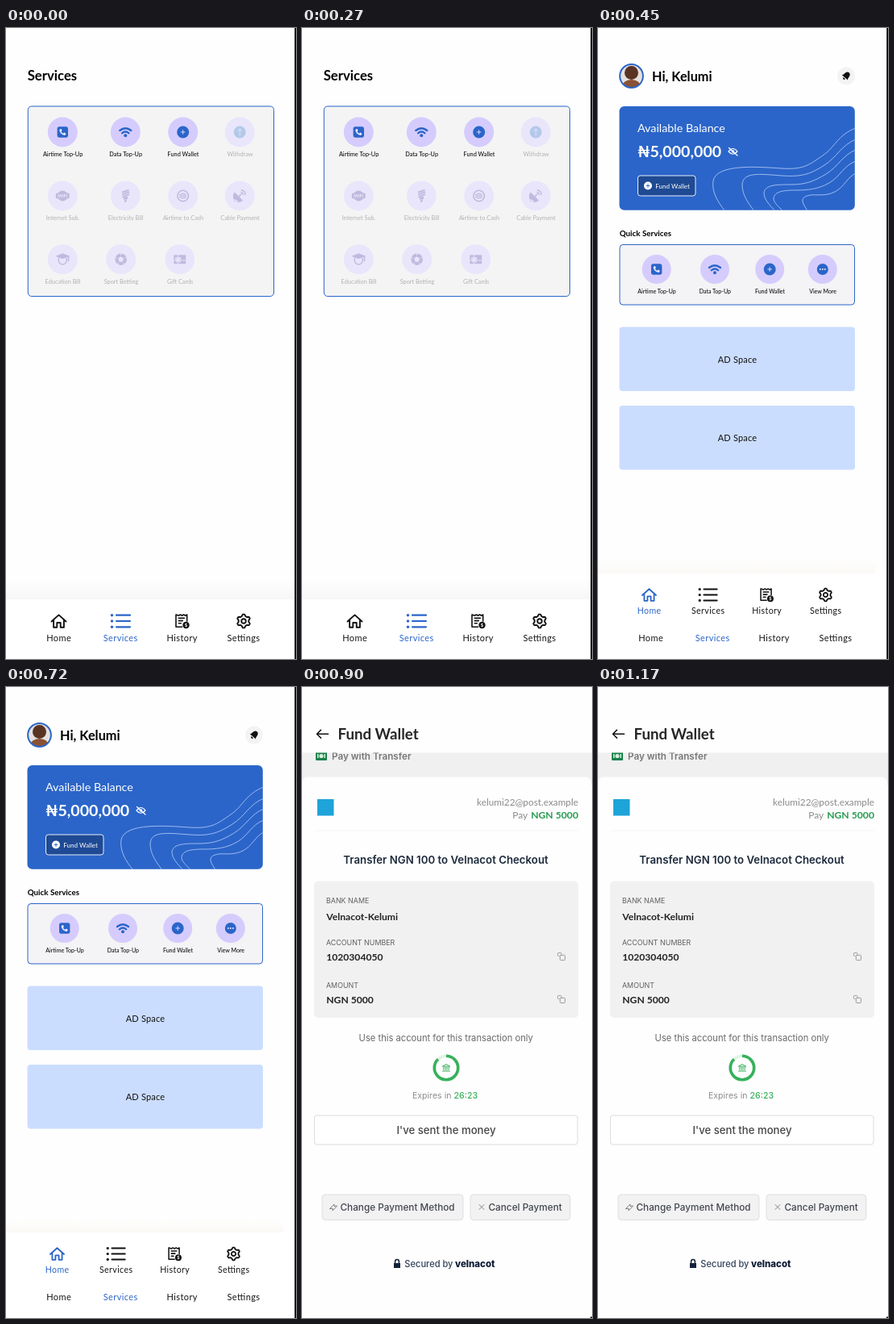
An HTML page that plays this animation: 360 by 782 pixels, repeating every 1.35 s.

```html
<!DOCTYPE html>
<html lang="en">
<head>
<meta charset="utf-8">
<title>Wallet app screens</title>
<style>
  html, body { margin: 0; width: 100%; height: 100%; overflow: hidden; background: #fefefe; }
  svg { display: block; width: 100vw; height: 100vh; }
  text { font-family: Lato, sans-serif; font-feature-settings: "liga"; white-space: pre; }
  .inter { font-family: Inter, sans-serif; }
  .line { fill: none; stroke: currentColor; stroke-linecap: round; stroke-linejoin: round; }
  .fill { fill: currentColor; }
  .screen { opacity: 0; animation: show 1350ms step-end infinite; }
  #home { animation-delay: -900ms; }
  #payment { animation-delay: -450ms; }
  @keyframes show {
    0% { opacity: 1; }
    33.3333%, 100% { opacity: 0; }
  }
</style>
</head>
<body>
<svg viewBox="0 0 360 782" xmlns="http://www.w3.org/2000/svg">
  <defs>
    <linearGradient id="shade" x2="0" y2="1">
      <stop stop-color="#fefefe"/><stop offset="1" stop-color="#f7f7f7"/>
    </linearGradient>
    <linearGradient id="warmShade" x2="0" y2="1">
      <stop stop-color="#fefefe"/><stop offset="1" stop-color="#fbf9f5"/>
    </linearGradient>
    <clipPath id="card"><rect x="26.5" y="97" width="292.3" height="128.7" rx="6"/></clipPath>
    <clipPath id="avatar"><circle cx="41.5" cy="59.5" r="14"/></clipPath>
    <clipPath id="scrolled"><rect y="81.5" width="360" height="31"/></clipPath>
  </defs>
  <g id="services" class="screen"></g>
  <g id="home" class="screen"></g>
  <g id="payment" class="screen"></g>
</svg>
<script>
const BLUE = '#2b65c9', LILAC = '#d5ccfd', PALE = '#f4f4f5', GREEN = '#36b15b';

const rect = (x, y, w, h, fill, r = 0, stroke = 'none') =>
  `<rect x="${x}" y="${y}" width="${w}" height="${h}" rx="${r}" fill="${fill}" stroke="${stroke}"/>`;
const circle = (x, y, r, fill, extra = '') =>
  `<circle cx="${x}" cy="${y}" r="${r}" fill="${fill}" ${extra}/>`;
const line = (d, width = 1) => `<path class="line" d="${d}" stroke-width="${width}"/>`;
const solid = d => `<path class="fill" d="${d}"/>`;
const at = (x, y, color, body, scale = 1) =>
  `<g transform="translate(${x} ${y}) scale(${scale})" color="${color}">${body}</g>`;

function text(x, y, size, str, { fill = '#000', weight = 400, anchor = 'start', space = 0, font = '' } = {}) {
  return `<text class="${font}" x="${x}" y="${y}" font-size="${size}" fill="${fill}" ` +
    `font-weight="${weight}" text-anchor="${anchor}" letter-spacing="${space}">${str}</text>`;
}
const inter = (x, y, size, str, options) => text(x, y, size, str, { font: 'inter', ...options });

const gearOutline = Array.from({ length: 24 }, (_, i) => {
  const r = i % 4 < 2 ? 8.4 : 6.3, a = (i - 0.5) * Math.PI / 12 - Math.PI / 2;
  return `${(r * Math.cos(a)).toFixed(2)} ${(r * Math.sin(a)).toFixed(2)}`;
}).join('L');

// Icons are centred on 0,0 and take their main colour from the group.
const paint = (d, color, width = 1) => `<g color="${color}">${line(d, width)}</g>`;
const disc = d => '<circle class="fill" r="7.5"/>' + paint(d, '#e4e6ff', 0.9);
const icons = {
  phone: '<rect class="fill" x="-6.7" y="-6.7" width="13.4" height="13.4" rx="2.6"/>' +
    '<path fill="#e9e6ff" d="M-3.6-3.6l1.9-.4 1 2.2-1.1 1q.8 1.7 2.6 2.5l1-1.1 2.2 1-.4 2q-1.2.7-3 0-3.1-1.3-4.3-4.4-.6-1.6.1-2.8z"/>',
  wifi: line('M-7-2Q0-7.6 7-2M-4.2 1.3Q0-2.2 4.2 1.3', 2.3) + '<circle class="fill" cy="4.2" r="2"/>',
  plus: disc('M-2.4 0h4.8M0-2.4v4.8'),
  up: disc('M0 4V-4M-2.4-1.7L0-4 2.4-1.7'),
  more: '<circle class="fill" r="7"/>' + [-3, 0, 3].map(x => circle(x, 0, 1, '#e4e6ff')).join(''),
  hotspot: '<circle class="fill" r="6.4"/><rect class="fill" x="-8.5" y="-3.5" width="17" height="7" rx="2"/>' +
    text(0, 2, 5.5, 'WiFi', { fill: '#ece9fb', weight: 700, anchor: 'middle' }),
  bulb: line('M-3.5-4.5L3.5-7M-3.5-1.8L4-4.4M-3 1L4-1.6', 1.9) + solid('M-3 2.2L3 .8 2.5 4-1.6 5zM-1.5 5.5l3-.7-.7 3.2h-1.8z'),
  swap: '<circle class="line" r="6.8" stroke-width="1.6"/>' +
    line('M-4-1.2Q0-4.4 4-1.2M-4 1.2Q0 4.4 4 1.2M-2.5 0h5', 1.4),
  dish: solid('M-6.3-4.5A7.2 7.2 0 0 0 4 5.8zM-6 4l4 3h-5z') + line('M-1 .6L1.7-2M1.8-4.3a3 3 0 0 1 2.5 2.6M2-7a5.8 5.8 0 0 1 5 5', 1.5),
  graduate: solid('M0-7.5L9-4 0-.5-9-4z') + line('M-5-1.5v2.6A5 5.3 0 0 0 5 1.1V-1.5M7.3-3.5V2', 1.5),
  ball: '<circle class="line" r="5.2" stroke-width="4.2"/>' +
    paint('M0-7v1.6M6.5-2.2l-1.5.5M4 5.6L3 4.3M-4 5.6l1-1.3M-6.5-2.2l1.5.5', '#e9e6fb', 1),
  gift: '<rect class="fill" x="-7.5" y="-5.5" width="15" height="11" rx="1.2"/>' +
    paint('M-7.5 1.3h15M-2-5.5v11M-2 .8l-2.4 2.5M-2 .8L.4 3.3M-2 .8q-4.4-1.2-3-2.7t3 2.7q4.4-1.2 3-2.7t-3 2.7', '#e9e6fb', 1.1),
  house: line('M-9 .5L0-7.6 9 .5M-6.4-1.2V7.7h4.2V2h4.4v5.7h4.2V-1.2', 1.9),
  list: [-7.3, 0, 7.3].map(y => `<circle class="fill" cx="-11" cy="${y}" r="1.7"/>` + line(`M-5.5 ${y}H11.5`, 2.2)).join(''),
  receipt: line('M6.2 0V-8l-2 1.2-2.1-1.2L0-6.8-2.1-8l-2.1 1.2L-7.5-8V7.2H0M-4.2-3.6h7M-4.2-.4h5M-4.2 2.8h3', 1.6) +
    '<circle class="fill" cx="5" cy="5" r="4.2"/>' +
    text(5, 7.1, 6, '$', { fill: '#fff', weight: 700, anchor: 'middle' }),
  gear: line(`M${gearOutline}Z`, 1.9) + '<circle class="line" r="2.8" stroke-width="1.9"/>',
  hiddenEye: line('M-5.5 0Q0-7 5.5 0Q0 6.5-5.5 0M-5-4.5L5.5 5', 1.2) + '<circle class="fill" r="1.8"/>',
  bell: `<g transform="rotate(40)">${solid('M-5 2.6q1.3-1 1.3-4Q-3.4-5.6 0-6q3.4.4 3.7 4.6 0 3 1.3 4zM-1.7 3.6h3.4q-.3 2-1.7 2t-1.7-2z')}</g>`,
  copy: '<rect class="line" x="-1.7" y="-1.7" width="6.2" height="6.2" rx="1"/>' + line('M-3-.7h-.7q-.8 0-.8-.8v-2.2q0-.8.8-.8h2.2Q.2-4.5.2-3.7v.6'),
  bank: line('M-4.4-2L0-4.5 4.4-2zM-3.2-.6v3M-1-.6v3M1-.6v3M3.2-.6v3M-4.5 4h9', 1),
  lock: solid('M-4-1h8v6h-8z') + line('M-2.4-1v-2a2.4 2.4 0 0 1 4.8 0v2', 1.5),
};
const icon = (name, x, y, color, scale) => at(x, y, color, icons[name], scale);

function service(x, y, name, label, { faded = false, size = 7.35, r = 18.5, gap = 30.3, color } = {}) {
  return circle(x, y, r, faded ? '#e9e6fb' : LILAC) +
    icon(name, x, y, color || (faded ? '#c1badf' : BLUE)) +
    text(x + 0.3, y + gap, size, label, { fill: faded ? '#b1b1b4' : '#000', anchor: 'middle' });
}

const tabs = [['Home', 'house'], ['Services', 'list'], ['History', 'receipt'], ['Settings', 'gear']];
const tabColor = (i, active, idle) => i === active ? BLUE : idle;
const tabLabels = (xs, y, size, active) => tabs.map(([label], i) =>
  text(xs[i], y, size, label, { fill: tabColor(i, active, '#151515'), anchor: 'middle', space: 0.4 })).join('');
const tabIcons = (xs, y, active, scale) => tabs.map(([, name], i) =>
  icon(name, xs[i], y, tabColor(i, active, '#111'), scale)).join('');

const page = rect(0, 0, 360, 782, '#fefefe');
const edge = rect(358.3, 0, 1.7, 782, '#000');
const labelXs = [65.7, 142.2, 218.7, 295];

function servicesScreen() {
  const rows = [
    [129, [[70.3, 'phone', 'Airtime Top-Up'], [148.3, 'wifi', 'Data Top-Up'], [219.7, 'plus', 'Fund Wallet'],
      [290.2, 'up', 'Withdraw', { faded: true, color: '#b3c9ea' }]]],
    [208, [[70.3, 'hotspot', 'Internet Sub.'], [148.3, 'bulb', 'Electricity Bill'], [219.7, 'swap', 'Airtime to Cash'],
      [290.2, 'dish', 'Cable Payment']]],
    [286.7, [[70.3, 'graduate', 'Education Bill'], [142.7, 'ball', 'Sport Betting'], [215.8, 'gift', 'Gift Cards']]],
  ];
  const grid = rows.map(([y, cells], row) => cells.map(([x, name, label, options]) =>
    service(x, y, name, label, options || { faded: row > 0 })).join('')).join('');
  return page + text(26.7, 65, 16.7, 'Services', { weight: 700 }) +
    rect(27.3, 97, 305.2, 235.5, PALE, 4.5, BLUE) + grid +
    rect(0, 684, 360, 24, 'url(#shade)') + rect(0, 708, 360, 74, '#fff') +
    tabIcons([65.5, 142.5, 218.5, 295], 735, 1, 1) + tabLabels(labelXs, 760, 11, 1) + edge;
}

function homeScreen() {
  const waves = [
    'M320 124C298 132 294 148 279 158S257 176 228 174 148 168 143 189C141 203 148 215 158 227',
    'M320 138C302 145 297 160 281 170S255 185 228 183 180 178 179 194C179 207 186 216 194 227',
    'M320 151C304 157 298 172 283 181S258 194 240 194 208 194 206 204C206 213 213 219 220 227',
    'M320 165C305 170 301 184 287 192S260 201 246 201 219 202 218 211C218 217 225 222 230 227',
    'M320 180C309 185 306 197 294 203S270 206 264 207 253 210 254 215 258 222 260 227',
  ];
  const person = circle(41.5, 59.5, 14, '#e4e1de') +
    `<g clip-path="url(#avatar)">${circle(41.5, 55.5, 8.5, '#5a3423')}` +
    '<path fill="#8a5234" d="M29 76q1-12 12.5-12T54 76z"/></g>' +
    circle(41.5, 59.5, 14.4, 'none', `stroke="${BLUE}" stroke-width="2"`);
  const quick = [[72.7, 'phone', 'Airtime Top-Up'], [145, 'wifi', 'Data Top-Up'],
    [213.2, 'plus', 'Fund Wallet'], [278.8, 'more', 'View More']];
  const iconXs = [63.5, 136.7, 209.2, 282.5];
  const ad = y => rect(26.5, y, 292.5, 79.5, '#cbddff', 4) +
    text(173, y + 44, 11, 'AD Space', { anchor: 'middle', space: 0.2, fill: '#111' });
  return page + person + text(67, 66, 16.3, 'Hi, Kelumi', { weight: 700 }) +
    circle(308, 59.5, 11, '#f3f3f3') + icon('bell', 308, 59.5, '#111', 0.95) +
    rect(26.5, 97, 292.3, 128.7, BLUE, 6) +
    `<g clip-path="url(#card)" color="#9dbaf0">${waves.map(d => line(d, 1)).join('')}</g>` +
    text(49, 129, 14.3, 'Available Balance', { fill: '#fff' }) +
    text(49, 160, 19.6, '₦', { fill: '#fff', weight: 700 }) +
    text(64.4, 160, 19.6, '5,000,000', { fill: '#fff', weight: 700 }) +
    icon('hiddenEye', 167.5, 153, '#fff') +
    rect(49.5, 183, 71.5, 25, '#1f4a94', 3, '#e8effc') + circle(62, 195.5, 5, '#fff') +
    at(62, 195.5, BLUE, line('M-2 0h4M0-2v4', 0.9)) +
    text(71.3, 198.6, 8.1, 'Fund Wallet', { fill: '#fff' }) +
    text(26.7, 258, 9.8, 'Quick Services', { weight: 700 }) +
    rect(27, 268.5, 291.5, 74.5, '#f4f3f5', 4, BLUE) +
    quick.map(([x, name, label]) => service(x, 299, name, label, { size: 7.05, r: 18, gap: 29.5 })).join('') +
    ad(370.5) + ad(468) +
    rect(0, 660, 344, 16, 'url(#warmShade)') + rect(0, 676, 358, 106, '#fff') +
    tabIcons(iconXs, 702.5, 0, 0.95) + tabLabels([63.7, 136.7, 209.7, 282.7], 726, 10.6, 0) +
    tabLabels(labelXs, 760, 11, 1) + edge;
}

function paymentScreen() {
  const right = { anchor: 'end' }, middle = { anchor: 'middle' };
  const fields = [
    [268, 288.5, 'BANK NAME', 'Velnacot-Kelumi'],
    [320.3, 339, 'ACCOUNT NUMBER', '1020304050'],
    [372.8, 392, 'AMOUNT', 'NGN 5000'],
  ].map(([labelY, valueY, label, value], i) =>
    inter(30, labelY, 8.9, label, { fill: '#606060' }) +
    text(30.3, valueY, 12.1, value, { weight: 700, fill: '#222' }) +
    (i ? icon('copy', 322, valueY - 5, '#9a9a9a') : '')).join('');
  const transferTab = '<g clip-path="url(#scrolled)">' + rect(17, 80, 14, 11, '#18824a', 1) +
    circle(24, 85.5, 2.6, '#d5efdd') + rect(19, 83, 1.5, 5, '#d5efdd') + rect(27.5, 83, 1.5, 5, '#d5efdd') +
    inter(37, 89.5, 11.7, 'Pay with Transfer', { weight: 600, fill: '#777' }) + '</g>';
  const timer = circle(179, 472, 14.7, 'none', 'stroke="#dff3e5" stroke-width="3.6"') +
    circle(179, 472, 14.7, 'none', `stroke="${GREEN}" stroke-width="3.6" pathLength="100" ` +
      'stroke-dasharray="88 12" transform="rotate(-90 179 472)"') + icon('bank', 179, 472, GREEN);
  const action = (x, w, labelX, label) => rect(x, 629, w, 31.5, '#f2f2f3', 4, '#dfdfe1') +
    inter(labelX, 648.8, 11.75, label, { weight: 500, fill: '#43474e' });
  return page +
    at(25.5, 58.3, '#111', line('M7 0H-7M-2-5L-7 0-2 5', 1.6)) +
    text(44.5, 65, 18.7, 'Fund Wallet', { weight: 700, fill: '#262626' }) +
    rect(0, 81.5, 360, 40, '#f0f0f0') + transferTab +
    rect(0, 111.5, 359, 670, '#fefefe', 7) + rect(15, 177.5, 328, 1, '#f8f8f8') +
    rect(19, 139, 20.5, 20.5, '#1ea4d8') +
    text(343, 147.3, 11.8, 'kelumi22@post.example', { ...right, fill: '#8b8b8b' }) +
    text(280.3, 163, 12, 'Pay', { ...right, fill: '#8b8b8b' }) +
    text(343, 163, 12.2, 'NGN 5000', { ...right, weight: 700, fill: '#259b50' }) +
    inter(51.3, 218.7, 13.25, 'Transfer NGN 100 to Velnacot Checkout', { weight: 600, fill: '#1c2a3c' }) +
    rect(15, 240.5, 328, 169.5, '#f1f1f1', 5) + fields +
    inter(178.7, 439, 11.2, 'Use this account for this transaction only', { ...middle, fill: '#686868' }) +
    timer +
    inter(177.5, 510, 10.6, `Expires in <tspan fill="${GREEN}" font-weight="500">26:23</tspan>`, { ...middle, fill: '#8d8d8d' }) +
    rect(15.5, 531, 326.5, 36, '#fff', 3, '#dcdcdc') +
    inter(179, 554.3, 13.15, 'I\'ve sent the money', { ...middle, weight: 500, fill: '#454545' }) +
    action(25, 175, 47.5, 'Change Payment Method') + action(209, 124, 231.5, 'Cancel Payment') +
    at(39, 645, '#777', line('M-4.5 1.5L1-4V-1.5L4.5-2-1 4V1.5z', 0.9)) +
    at(223, 644.5, '#888', line('M-3-3L3 3M3-3L-3 3', 1)) +
    icon('lock', 118, 715, '#14223a') +
    inter(127.3, 718.6, 11.1, 'Secured by', { weight: 500, fill: '#33415a' }) +
    inter(190, 718.6, 11.5, 'velnacot', { weight: 800, fill: '#0d1b35' }) +
    rect(358, 780.5, 2, 1.5, '#000');
}

const screens = { services: servicesScreen, home: homeScreen, payment: paymentScreen };
for (const [id, draw] of Object.entries(screens)) document.getElementById(id).innerHTML = draw();
</script>
</body>
</html>
```
